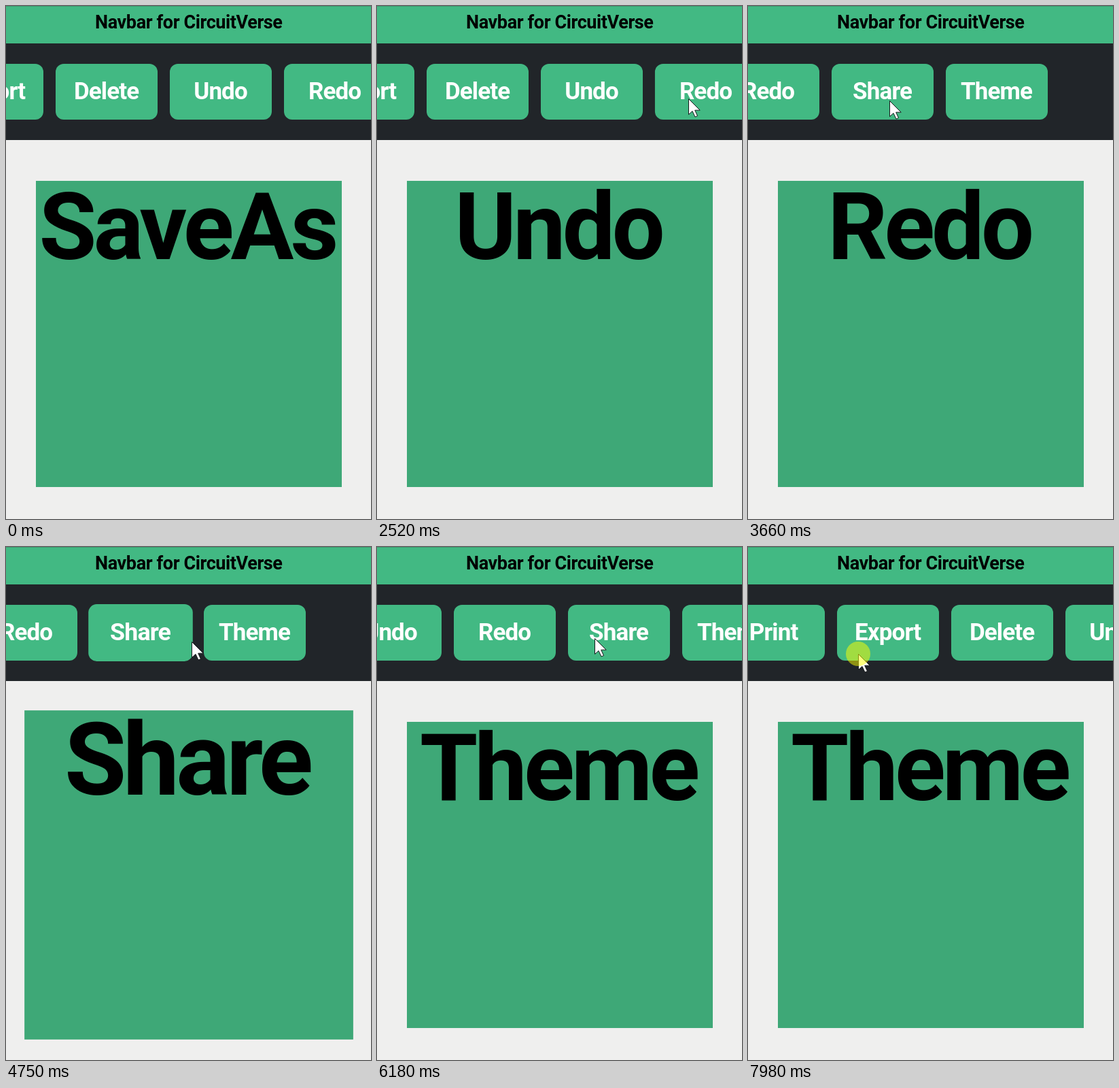
Recreate the animation shown at these times as an HTML page with a canvas. Size 537 by 754 pixels, loop 8000 ms.

```html
<!DOCTYPE html>
<html lang="en">
<head>
<meta charset="utf-8">
<title>Navbar for CircuitVerse</title>
<style>
  html, body { margin: 0; width: 100%; height: 100%; overflow: hidden; background: #efefee; }
  canvas { display: block; }
</style>
</head>
<body>
<canvas id="stage" width="537" height="754"></canvas>
<script>
const ctx = document.getElementById('stage').getContext('2d');
const LOOP = 8000;
const GREEN = '#42b983';
const LABELS = ['SaveAs', 'Print', 'Export', 'Delete', 'Undo', 'Redo', 'Share', 'Theme'];
const PITCH = 168, FIRST_X = 73 - 3 * PITCH;
const GROW = 0.09, HALF = 200;   // size and half length of a pulse
const LAG = 75;                  // the card follows its button
const PRESS = 90;                // the halo shows before a click lands

const CLICKS = { Undo: 1360, Redo: 2520, Share: 4460, Theme: 5390 };
const PRESSES = [...Object.values(CLICKS), LOOP + 60];

// Each glide of the pointer ends at x, y.
const ENTRY = { x: 462, y: 704 };
const GLIDES = [
  { from: 280, to: 480, x: 376, y: 278 },
  { from: 690, to: 1090, x: 329, y: 133 },
  { from: 1950, to: 2430, x: 458, y: 136 },
  { from: 2920, to: 3640, x: 208, y: 139 },
  { from: 4560, to: 4750, x: 273, y: 139 },
  { from: 4800, to: 5200, x: 366, y: 140 },
  { from: 5690, to: 6180, x: 320, y: 134 },
  { from: 6180, to: 7790, x: 127, y: 155 },
  { from: 7890, to: 7970, x: 162, y: 157 }
];

const ramp = (t, a, b) => Math.min(1, Math.max(0, (t - a) / (b - a)));
const smooth = u => u * u * (3 - 2 * u);
const ease = u => 1 - Math.pow(1 - u, 2.2);

const scrollAt = t => Math.round(454 * smooth(ramp(t, 2920, 3640)) - 680 * ramp(t, 5693, 7790));

function pointerAt(t) {
  return GLIDES.reduce((p, g) => {
    const u = smooth(ramp(t, g.from, g.to));
    return { x: p.x + (g.x - p.x) * u, y: p.y + (g.y - p.y) * u };
  }, ENTRY);
}

function pulse(t, start) {
  const peak = start + HALF;
  return 1 + GROW * (ease(ramp(t, start, peak)) - ease(ramp(t, peak, peak + HALF)));
}

function rect(color, x, y, w, h) {
  ctx.fillStyle = color;
  ctx.fillRect(x, y, w, h);
}

function text(str, x, y, size, color, spacing) {
  const gap = spacing * size;
  ctx.font = `700 ${size}px Roboto, "Open Sans", sans-serif`;
  ctx.letterSpacing = gap + 'px';
  ctx.textAlign = 'center';
  ctx.fillStyle = color;
  ctx.fillText(str, x + gap / 2, y);
}

function scaled(cx, cy, s, draw) {
  ctx.save();
  ctx.translate(cx, cy);
  ctx.scale(s, s);
  draw();
  ctx.restore();
}

function button(label, x, s) {
  scaled(x + 75, 126, s, () => {
    ctx.fillStyle = GREEN;
    ctx.beginPath();
    ctx.roundRect(-75, -41, 150, 82, 12);
    ctx.fill();
    text(label, 0, 11, 35, '#fff', -0.025);
  });
}

function card(word, s) {
  scaled(269, 482, s, () => {
    rect('#3ea877', -225, -225, 450, 450);
    text(word, 0, -110, 138, '#000', -0.035);
  });
}

function pointer(x, y) {
  const arrow = new Path2D('M.5 .5V23.5L6 18.5L10 27L13.5 25.5L9.7 17.2H17.2Z');
  scaled(x, y, 1, () => {
    ctx.fillStyle = '#fff';
    ctx.fill(arrow);
    ctx.strokeStyle = '#16191c';
    ctx.lineWidth = 1;
    ctx.stroke(arrow);
  });
}

function halo(x, y) {
  ctx.fillStyle = 'rgba(255, 255, 0, 0.5)';
  ctx.beginPath();
  ctx.arc(x, y, 18, 0, Math.PI * 2);
  ctx.fill();
}

function render(t) {
  rect('#efefee', 0, 0, 537, 754);
  rect(GREEN, 0, 0, 537, 55);
  rect('#3a9a6e', 0, 0, 537, 1);
  rect('#212529', 0, 55, 537, 142);
  text('Navbar for CircuitVerse', 269, 33, 27, '#000', -0.015);

  const scroll = scrollAt(t);
  LABELS.forEach((label, i) =>
    button(label, FIRST_X + i * PITCH - scroll, label in CLICKS ? pulse(t, CLICKS[label]) : 1));

  const chosen = Object.keys(CLICKS).filter(label => t >= CLICKS[label] + LAG).pop();
  card(chosen || LABELS[0], chosen ? pulse(t, CLICKS[chosen] + LAG) : 1);

  if (t < GLIDES[0].from) return;
  const p = pointerAt(t);
  const x = Math.round(p.x), y = Math.round(p.y);
  pointer(x, y);
  if (PRESSES.some(at => t >= at - PRESS && t < at)) halo(x, y);
}

const begin = performance.now();
function tick() {
  render((performance.now() - begin) % LOOP);
  requestAnimationFrame(tick);
}
tick();
</script>
</body>
</html>
```
